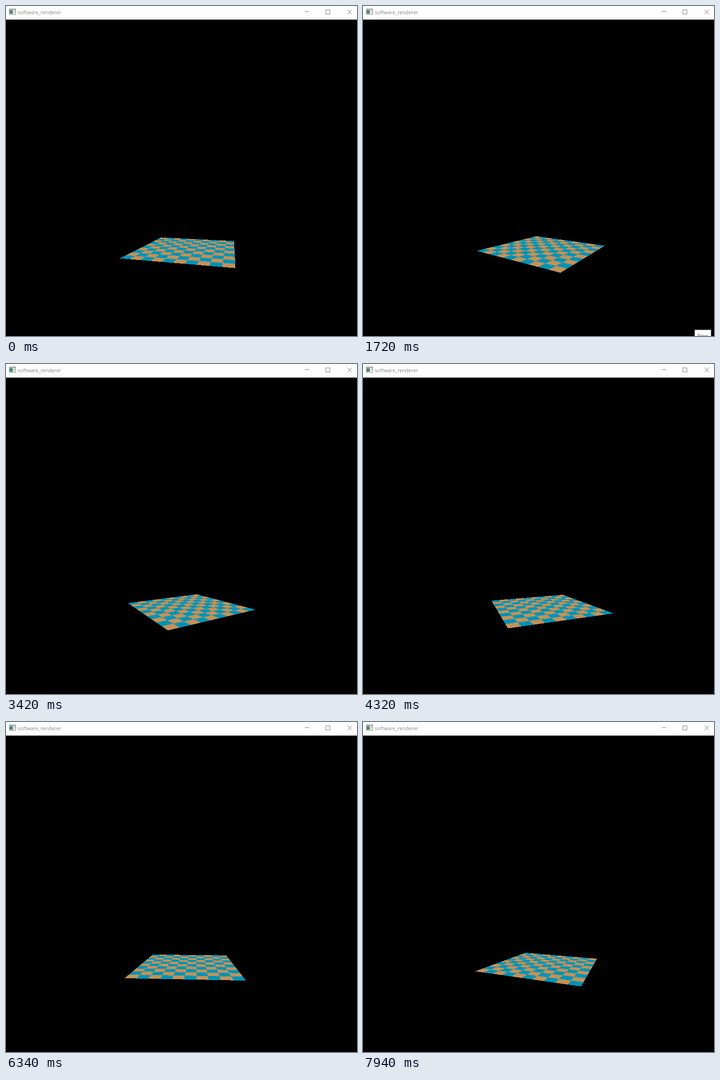
Animation of 772 by 725 pixels, one loop 8000 ms. Source, as an HTML page with a canvas:

```html
<!DOCTYPE html>
<html lang="en">
<head>
<meta charset="utf-8">
<title>software_renderer</title>
<style>
  html, body { margin: 0; width: 100%; height: 100%; overflow: hidden; background: #000; }
  #stage { position: relative; width: 772px; height: 725px; overflow: hidden; }
  canvas { position: absolute; left: 0; top: 0; }
  .label { position: absolute; white-space: pre; font-family: "Open Sans", "Noto Sans", sans-serif; }
  #title { left: 26px; top: 5px; font-size: 11.1px; line-height: 17px; color: #858585; }
  #tip { left: 729px; top: 711px; width: 35px; height: 24px; padding-left: 0; text-align: center;
         border: 1px solid #777; background: #fff; font-size: 11.4px; line-height: 26px; color: #444; }
</style>
</head>
<body>
<div id="stage">
  <canvas id="view" width="772" height="725"></canvas>
  <div id="title" class="label">software_renderer</div>
  <div id="tip" class="label">Stop</div>
</div>
<script>
const LOOP = 8000;
const ctx = document.getElementById('view').getContext('2d');
const tip = document.getElementById('tip');

// Perspective of the ground plane
const cam = { x: 396, horizon: 429.8, rise: 102.2, depth: 0.35, scale: 142.5, shift: 2.6 };
const area = { x: 236, y: 500, w: 324, h: 94 };
const CELLS = 10;
const ORANGE = [194, 146, 89], BLUE = [0, 147, 181], BLACK = [0, 0, 0];
const image = ctx.createImageData(area.w, area.h);

function rect(color, x, y, w, h) {
  ctx.fillStyle = color;
  ctx.fillRect(x, y, w, h);
}

function line(...pts) {
  ctx.beginPath();
  for (let i = 0; i < pts.length; i += 4) {
    ctx.moveTo(pts[i], pts[i + 1]);
    ctx.lineTo(pts[i + 2], pts[i + 3]);
  }
  ctx.stroke();
}

function drawWindow() {
  rect('#000', 0, 0, 772, 725);
  rect('#fff', 0, 0, 772, 30);
  rect('#d8d8d8', 0, 29, 772, 1);
  // Application icon
  rect('#8c8c88', 7, 6, 15, 13);
  rect('#f4f1ea', 8, 8, 13, 10);
  rect('#4c8a80', 8, 9, 7, 8);
  rect('#e6dccb', 16, 9, 2, 8);
  rect('#8c8c88', 19, 9, 1, 5);
  // Window buttons
  ctx.lineWidth = 1;
  ctx.strokeStyle = '#777';
  line(657, 12.5, 667, 12.5);
  ctx.strokeRect(703.5, 8.5, 9, 9);
  line(751, 8, 761, 18, 761, 8, 751, 18);
}

function cellColor(px, py, sin, cos) {
  const w = cam.rise / (py - cam.horizon);
  const z = (w - 1) / cam.depth;
  const x = ((px - cam.x) * w - cam.shift) / cam.scale;
  const front = x * sin - z * cos;
  const right = x * cos + z * sin;
  const u = (front + right + 1) / 2 * CELLS;
  const v = (front - right + 1) / 2 * CELLS;
  if (u < 0 || v < 0 || u >= CELLS || v >= CELLS) return BLACK;
  return (Math.floor(u) + Math.floor(v)) % 2 ? BLUE : ORANGE;
}

function drawBoard(degrees) {
  const a = degrees * Math.PI / 180;
  const sin = Math.sin(a), cos = Math.cos(a);
  let i = 0;
  for (let y = 0; y < area.h; y++) {
    for (let x = 0; x < area.w; x++) {
      const [r, g, b] = cellColor(area.x + x + 0.5, area.y + y + 0.5, sin, cos);
      image.data[i++] = r;
      image.data[i++] = g;
      image.data[i++] = b;
      image.data[i++] = 255;
    }
  }
  ctx.putImageData(image, area.x, area.y);
}

// Steps last 100 ms, except two short ones of 20 ms
function stepAt(t) {
  const skipped = (t >= 1120 ? 80 : 0) + (t >= 4440 ? 80 : 0);
  return Math.floor((t + skipped) / 100);
}

let shown = -1;
function tick(now) {
  const step = stepAt(now % LOOP);
  if (step !== shown) {
    shown = step;
    drawBoard(31 - 1.22 * step);
    tip.style.visibility = step >= 15 && step < 32 ? 'visible' : 'hidden';
  }
  requestAnimationFrame(tick);
}

drawWindow();
tick(performance.now());
</script>
</body>
</html>
```
